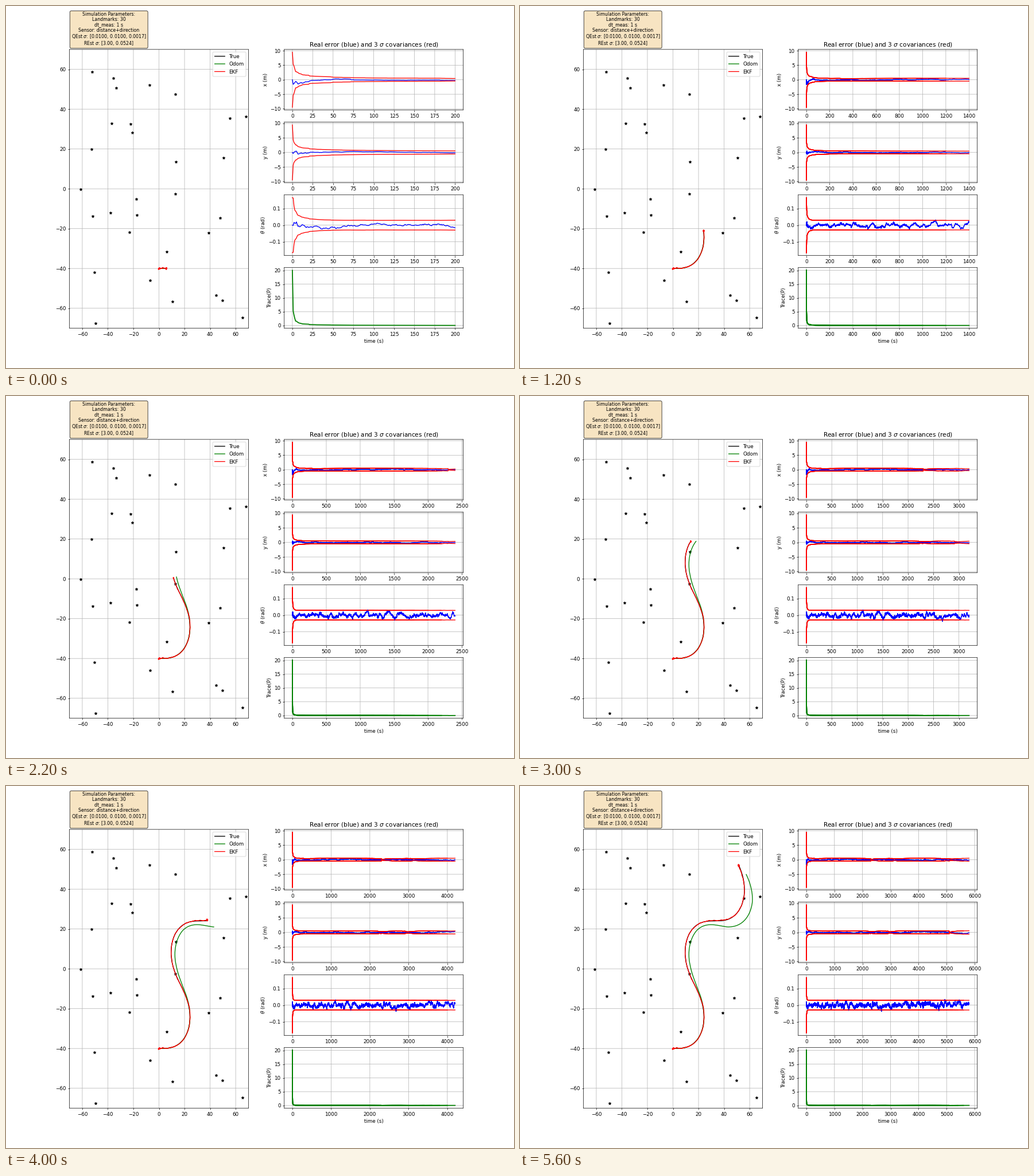
Write a matplotlib script that moves like this. It is 885x632 px and loops after 5800 ms.

```python
import numpy as np
import matplotlib.pyplot as plt
from matplotlib.animation import FuncAnimation

plt.rcParams["path.snap"] = False
DPI = 63.2
SEED = 123456
STEP, FRAMES = 200, 29
N = STEP * FRAMES
OVERLAYS = 8  # earlier curves stay on the error plots; more than this looks the same
Q = np.array([0.01, 0.01, np.radians(0.1)])  # odometry noise, sigma
R = np.array([3, np.radians(3)])  # sensor noise, sigma
t = np.arange(N + 1)

landmarks = 140 * (np.random.RandomState(SEED).rand(2, 30) - 0.5)


def wrap(a):
    return (a + np.pi) % (2 * np.pi) - np.pi


def move(pose, u):
    """Apply the body-frame motion u = (forward, left, turn)."""
    x, y, th = pose
    c, s = np.cos(th), np.sin(th)
    return np.array([x + c * u[0] - s * u[1], y + s * u[0] + c * u[1], wrap(th + u[2])])


def observe(pose, mark):
    dx, dy = mark - pose[:2]
    return np.array([np.hypot(dx, dy), wrap(np.arctan2(dy, dx) - pose[2])])


def predict(pose, cov, u):
    c, s = np.cos(pose[2]), np.sin(pose[2])
    F = np.array([[1, 0, -s * u[0] - c * u[1]], [0, 1, c * u[0] - s * u[1]], [0, 0, 1]])
    G = np.array([[c, -s, 0], [s, c, 0], [0, 0, 1]])
    return move(pose, u), F @ cov @ F.T + G @ np.diag(Q ** 2) @ G.T


def correct(pose, cov, z, mark):
    dx, dy = mark - pose[:2]
    d = np.hypot(dx, dy)
    H = np.array([[-dx / d, -dy / d, 0], [dy / d ** 2, -dx / d ** 2, -1]])
    innovation = z - observe(pose, mark)
    innovation[1] = wrap(innovation[1])
    K = cov @ H.T @ np.linalg.inv(H @ cov @ H.T + np.diag(R ** 2))
    pose = pose + K @ innovation
    pose[2] = wrap(pose[2])
    cov = (np.eye(3) - K @ H) @ cov
    return pose, (cov + cov.T) / 2


def simulate():
    """Return true poses, estimated poses and covariances for every step."""
    true = est = np.array([1, -40, -np.pi / 2])
    cov = 10 * np.diag([1, 1, np.radians(1) ** 2])
    log = [(true, est, cov)]
    for k in range(1, N + 1):
        u = np.array([0, 0.025, np.radians(0.1) * np.sin(3 * np.pi * k / 6000)])
        true = move(true, u)
        noise = Q * np.random.RandomState(SEED * 2 + k).randn(3)
        est, cov = predict(est, cov, u + noise)
        rng = np.random.RandomState(SEED * 3 + k)
        mark = landmarks[:, rng.randint(0, 29)]
        z = observe(true, mark) + R * rng.randn(2)
        est, cov = correct(est, cov, z, mark)
        log.append((true, est, cov))
    return [np.array(column) for column in zip(*log)]


true, est, cov = simulate()
error = est - true
error[:, 2] = wrap(error[:, 2])
sigma3 = 3 * np.sqrt(np.diagonal(cov, axis1=1, axis2=2))
trace = np.trace(cov, axis1=1, axis2=2)

# Odometry slowly drifts away from the true path
knots = [0, 1400, 1900, 2400, 3200, 4200, 5200, 5800]
odom = true[:, :2] + np.column_stack([
    np.interp(t, knots, [0, 0.1, 0.8, 2.3, 4.1, 5.2, 6.3, 5.8]),
    np.interp(t, knots, [0, 0, 0.2, 0.6, 0, -3.1, -4.3, -4.6])])

fig = plt.figure(figsize=((885 + 1e-6) / DPI, (632 + 1e-6) / DPI), dpi=DPI)

# Map
ax = fig.add_subplot(1, 2, 1)
ax.plot(*landmarks, "k*", markersize=5.6)
paths = [(ax.plot([], [], color, label=name)[0], path) for color, name, path in (
    ("k", "True", true), ("g", "Odom", odom), ("r", "EKF", est))]
ellipse, = ax.plot([], [], "r")
ax.axis([-70, 70, -70, 70])
ax.grid(True)
ax.legend(loc="upper right")
ax.text(0.22, 1.009,
        "Simulation Parameters:\nLandmarks: 30\ndt_meas: 1 s\nSensor: distance+direction\n"
        "QEst $\\sigma$: [0.0100, 0.0100, 0.0017]\nREst $\\sigma$: [3.00, 0.0524]",
        transform=ax.transAxes, fontsize=9, linespacing=1.04, ha="center", va="bottom",
        bbox=dict(boxstyle="round", facecolor="wheat", alpha=0.8))

# Error plots
panels, curves = [], []


def add_panel(row, label, ylim, *series):
    """series: (values, colour, line width) from bottom to top."""
    p = fig.add_subplot(4, 2, 2 * row)
    p.set_ylabel(label)
    p.grid(True)
    p.set_ylim(*ylim)
    panels.append(p)
    for age in reversed(range(OVERLAYS)):
        for v, color, width in series:
            curves.append((p.plot([], [], color, lw=width)[0], v, age))


for i, label in enumerate(("x (m)", "y (m)", r"$\theta$ (rad)")):
    bound = sigma3[:, i]
    top = 1.1 * bound.max()
    add_panel(i + 1, label, (-top, top),
              (error[:, i], "b", 1.5), (bound, "r", 1.5), (-bound, "r", 1.5))
add_panel(4, "Trace(P)", (-0.95, 21), (trace, "g", 2))
panels[0].set_title("Real error (blue) and 3 $\\sigma$ covariances (red)")
panels[-1].set_xlabel("time (s)")

angle = np.linspace(0, 2 * np.pi, 40)
circle = np.array([np.cos(angle), np.sin(angle)])


def update(i):
    n = STEP * (i + 1)
    for line, path in paths:
        line.set_data(path[:n + 1, 0], path[:n + 1, 1])
    root = np.linalg.cholesky(cov[n, :2, :2])
    ellipse.set_data(*(est[n, :2, None] + 3 * root @ circle))
    for line, v, age in curves:
        end = n - STEP * age
        stop = end + 1 if end > 0 else 0
        line.set_data(t[:stop], v[:stop])
    for p in panels:
        p.set_xlim(-0.05 * n, 1.05 * n)
    return []


anim = FuncAnimation(fig, update, frames=FRAMES, interval=200, init_func=lambda: update(0),
                     repeat=True, blit=False)
plt.show()
```
